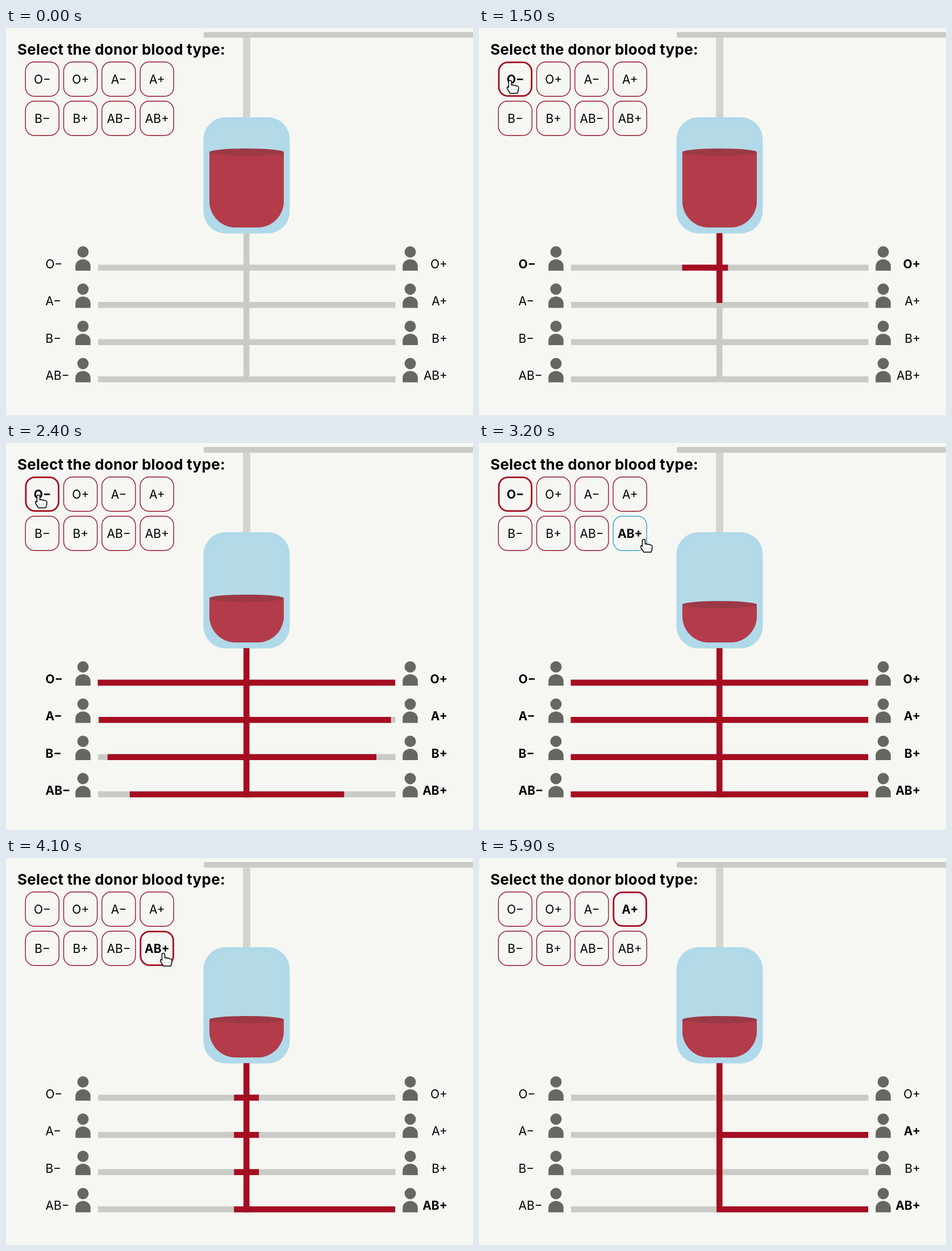
An HTML page with a canvas for the animation above (6600 ms loop, 822 by 681 pixels).

```html
<!DOCTYPE html>
<html lang="en">
<head>
<meta charset="utf-8">
<title>Blood donor compatibility</title>
<style>
html, body { margin: 0; width: 100%; height: 100%; overflow: hidden; background: #f6f7f2; }
canvas { display: block; }
</style>
</head>
<body>
<canvas id="stage" width="822" height="681"></canvas>
<script>
const ctx = document.getElementById('stage').getContext('2d');
const LOOP = 6600, STEP = 100;
const GREY = '#cacbc6', RED = '#a50d21';
const TYPES = ['O−', 'O+', 'A−', 'A+', 'B−', 'B+', 'AB−', 'AB+'];

// Each click picks a donor; receivers start filling one after another.
const CLICKS = [
  { at: 1213, donor: 0, to: [0, 1, 2, 3, 4, 5, 6, 7] },
  { at: 3480, donor: 7, to: [7] },
  { at: 4813, donor: 3, to: [3, 7] }
];

// Pointer path: time, x, y
const PATH = [
  [600, 15, 146], [800, 35, 117], [1000, 53, 94], [1200, 53, 94], [1900, 57, 91],
  [2400, 57, 92], [2600, 77, 102], [2700, 122, 114], [2900, 246, 156], [3000, 292, 172],
  [3100, 292, 172], [3200, 290, 170], [3500, 281, 166], [4000, 278, 169], [4100, 277, 168],
  [4200, 265, 140], [4300, 265, 140], [4600, 262, 92], [4700, 262, 92], [4900, 254, 86],
  [5100, 233, 69], [5400, 136, 16], [5600, 90, -30]
];

const HAND = new Path2D('M-2.5 2Q-2.5-.5 0-.5T2.5 2V8Q5 6.5 6.5 8.5Q9 7.3 10.5 9.5Q14.5 8.5 15 12L14.5 17L13 22H0L-5 14Q-6 10.5-3.5 10.5L-2.5 12Z');
const ARROW = new Path2D('M0 0V21.5L5 17L8.8 26L12.4 24.4L8.6 15.7H15Z');

const clamp = v => Math.min(1, Math.max(0, v));
const bezier = (u, a, b) => 3 * u * (1 - u) ** 2 * a + 3 * u * u * (1 - u) * b + u ** 3;

function ease(x) {
  x = clamp(x);
  let lo = 0, hi = 1;
  for (let i = 0; i < 24; i++) {
    const mid = (lo + hi) / 2;
    if (bezier(mid, .25, .25) < x) lo = mid; else hi = mid;
  }
  return x === 1 ? 1 : bezier(lo, .1, 1);
}

// Pipe level of a receiver; an interrupted change turns round where it is.
function pipe(type, t) {
  let from = 0, target = 0, start = 0, span = 1;
  const level = time => from + (target - from) * ease((time - start) / span);
  const turn = (time, next) => {
    if (time > t || next === target) return;
    from = level(time);
    target = next;
    start = time;
    span = 1000 * Math.abs(target - from) || 1;
  };
  for (const { at, to } of CLICKS) {
    turn(at, 0);
    if (to.includes(type)) turn(at + 100 * (to.indexOf(type) + 1), 1);
  }
  return { level: level(t), on: target === 1 };
}

function pointer(t) {
  const i = PATH.findIndex(p => p[0] > t);
  if (i < 1) return null;
  const [t0, x0, y0] = PATH[i - 1], [t1, x1, y1] = PATH[i];
  const k = (t - t0) / (t1 - t0);
  return { x: x0 + (x1 - x0) * k, y: y0 + (y1 - y0) * k };
}

function box(x, y, w, h, color, r = 0) {
  ctx.fillStyle = color;
  ctx.beginPath();
  ctx.roundRect(x, y, w, h, r);
  ctx.fill();
}

function text(s, x, y, size, bold, align = 'left') {
  ctx.font = `${bold ? 700 : 400} ${size}px Inter, "Open Sans", sans-serif`;
  ctx.textAlign = align;
  ctx.fillStyle = '#000';
  ctx.fillText(s, x, y);
}

function person(x, y) {
  ctx.fillStyle = '#666760';
  ctx.beginPath();
  ctx.arc(x, y - 33, 10, 0, 7);
  ctx.fill();
  ctx.beginPath();
  ctx.moveTo(x - 13.3, y);
  ctx.lineTo(x - 13.3, y - 8);
  ctx.ellipse(x, y - 8, 13.3, 12, 0, Math.PI, 0);
  ctx.lineTo(x + 13.3, y);
  ctx.fill();
}

const slot = i => ({ x: 33.5 + 67.3 * (i % 4), y: 59 + 69 * (i >> 2) });

function button(i, selected, hovered) {
  const { x, y } = slot(i), w = selected ? 2.8 : 1.4;
  ctx.strokeStyle = selected ? RED : hovered ? '#38a2d3' : '#981329';
  ctx.lineWidth = w;
  ctx.beginPath();
  ctx.roundRect(x + w / 2, y + w / 2, 60.5 - w, 62 - w, 16);
  ctx.stroke();
  text(TYPES[i], x + 30.5, y + 38.7, 21, selected || hovered, 'center');
}

function bag(t) {
  box(417, 15, 13, 145, '#d3d4cf');
  box(348, 7, 480, 10, GREY, 3);
  box(347.5, 157, 152, 204.5, '#b0d9e9', 39);
  box(358, 167, 131, 184, '#b5dae7', [32, 32, 46, 46]);
  const top = 218.5 + 66 * ease((t - 1715) / 1300);
  ctx.save();
  ctx.beginPath();
  ctx.roundRect(358, 167, 131, 184, [32, 32, 46, 46]);
  ctx.clip();
  box(358, top, 131, 140, '#b33b4a');
  ctx.fillStyle = '#9c3945';
  ctx.beginPath();
  ctx.ellipse(423.5, top, 65.5, 6.5, 0, 0, 7);
  ctx.fill();
  ctx.restore();
}

function receivers(t) {
  const rowY = i => 416.5 + 65.5 * (i >> 1);
  for (let i = 0; i < 8; i += 2) box(162, rowY(i), 523.5, 10.5, GREY);
  box(418, 361, 10.5, 252, GREY);
  box(418, 361, 10.5, 252 * ease((t - CLICKS[0].at) / 1000), RED);
  TYPES.forEach((type, i) => {
    const right = i % 2, y = rowY(i), { level, on } = pipe(i, t);
    const len = 267 * level;
    if (len > 0) box(right ? 418 : 428.5 - len, y, len, 10.5, RED);
    person(right ? 711.5 : 135.5, y + 10.5);
    text(type, right ? 777 : 69.5, y + 6, 21, on, right ? 'right' : 'left');
  });
}

function drawPointer(p, hand) {
  ctx.save();
  ctx.translate(p.x, p.y);
  ctx.lineJoin = 'round';
  ctx.lineWidth = 1.6;
  ctx.strokeStyle = '#111';
  ctx.fillStyle = '#fff';
  ctx.shadowColor = 'rgba(0,0,0,.3)';
  ctx.shadowBlur = 2;
  ctx.shadowOffsetY = 1;
  const shape = hand ? HAND : ARROW;
  ctx.fill(shape);
  ctx.shadowColor = 'transparent';
  ctx.stroke(shape);
  if (hand) {
    ctx.lineWidth = 1;
    ctx.strokeStyle = '#999';
    ctx.setLineDash([2, 1.5]);
    ctx.beginPath();
    ctx.moveTo(1, 15.5);
    ctx.lineTo(13, 15.5);
    ctx.stroke();
  }
  ctx.restore();
}

function draw(t) {
  box(0, 0, 822, 681, '#f6f7f2');
  bag(t);
  receivers(t);
  ctx.letterSpacing = '.25px';
  text('Select the donor blood type:', 20, 47, 26, true);
  ctx.letterSpacing = '0px';

  const p = pointer(t);
  const hover = p ? TYPES.findIndex((_, i) => {
    const { x, y } = slot(i);
    return p.x > x && p.x < x + 60.5 && p.y > y && p.y < y + 62;
  }) : -1;
  const click = CLICKS.filter(c => c.at <= t).pop();
  TYPES.forEach((_, i) => button(i, !!click && click.donor === i, hover === i));
  if (p) drawPointer(p, hover >= 0);
}

function tick() {
  draw(Math.floor(performance.now() % LOOP / STEP) * STEP);
  requestAnimationFrame(tick);
}
tick();
</script>
</body>
</html>
```
